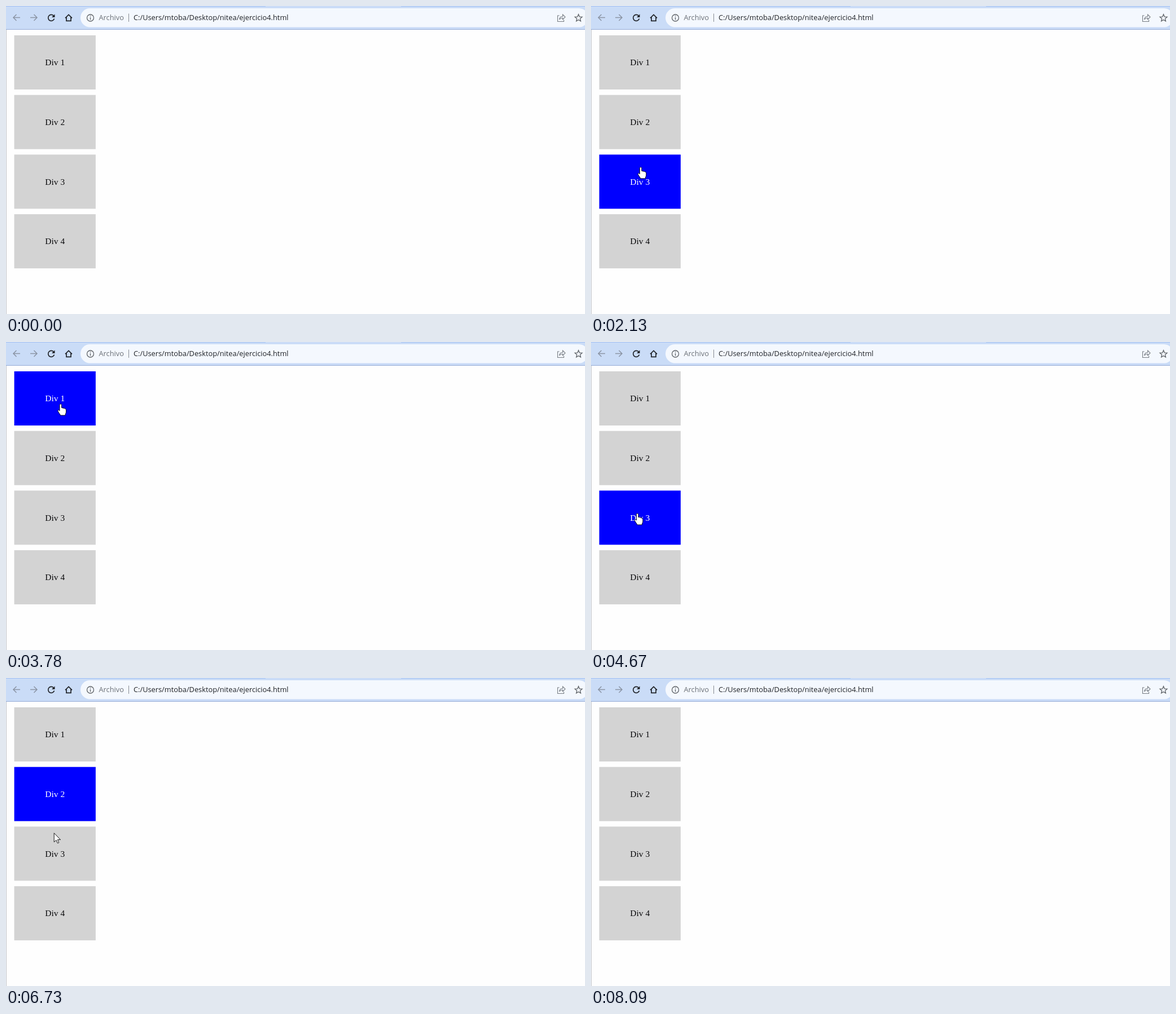
An HTML page that plays this animation: 1026x546 px, repeating every 8.42 s.

```html
<!DOCTYPE html>
<html lang="es">
<head>
<meta charset="utf-8">
<title>Hover</title>
<style>
  html, body { margin: 0; width: 100%; height: 100%; overflow: hidden; background: #fefefe; }
  svg { display: block; width: 1026px; height: 546px; }
  .ui { font: 12.8px "Open Sans", "Noto Sans", sans-serif; }
  .box text { font: 15.5px "Liberation Serif", "Times New Roman", serif; text-anchor: middle; }
  .icon { fill: none; stroke: #1f2227; stroke-width: 1.7; }
  .dim { stroke: #8b95a5; stroke-width: 1.5; }
  .thin { stroke: #5f6368; stroke-width: 1.3; }
  .faint { stroke: #777c83; stroke-width: 1.1; }
  #cursor path { fill: #fff; stroke: #000; stroke-width: .9; stroke-linejoin: round; }
</style>
</head>
<body>
<svg viewBox="0 0 1026 546">
  <rect width="1026" height="546" fill="#fefefe"/>
  <rect y="42" width="1" height="504" fill="#c4c6ca"/>

  <!-- Toolbar -->
  <rect width="1026" height="41" fill="#cadcf7"/>
  <path d="M0 .5H460M700 .5H1026" stroke="#a3c1f3"/>
  <path d="M0 41.5H1026" stroke="#94abd6"/>
  <rect x="132" y="4" width="900" height="33.5" rx="16.7" fill="#f4f8fe"/>
  <path class="icon dim" d="M25 20.5H13M18.5 15L13 20.5L18.5 26M43 20.5H55M49.5 15L55 20.5L49.5 26"/>
  <path class="icon" d="M84.6 17.5A5.5 5.5 0 1 0 85.5 22.5"/>
  <path d="M86.5 14.5V20H81Z" fill="#1f2227"/>
  <path class="icon" d="M105 21.3L111 15.5L117 21.3M107 20V26.3H115V20"/>
  <circle class="icon thin" cx="149.5" cy="21" r="6"/>
  <path class="icon thin" d="M149.5 20V24.5M149.5 17V18.5"/>
  <path d="M217.5 13.5V28" stroke="#858a91"/>
  <text class="ui" x="164.5" y="25.3" fill="#6b7077">Archivo</text>
  <text class="ui" x="226" y="25.3" fill="#202328">C:/Users/mtoba/Desktop/nitea/ejercicio4.html</text>
  <path class="icon faint" d="M980.5 17H977.5V27.5H988.5V24.5M980.5 24C981 20.5 983 18.5 986.5 18.5V15L991 19.5L986.5 24V21.3C984 21.3 982 22 980.5 24Z"/>
  <path id="star" class="icon thin"/>

  <g id="boxes"></g>
  <g id="cursor">
    <path id="arrow" d="M0 0V16L3.8 12.6L6.2 18L8.6 17L6.2 11.8H11.3Z"/>
    <path id="hand" d="M-2 1.5C-2 -.5 1.5 -.5 1.5 1.5V6.5L6 7.5C8.5 8 9.5 9 9.5 11V14C9.5 16 8 17 8 20H-.5C-1 18 -3.5 16 -5 12.5C-5.5 11 -4 10 -2.8 11L-2 12Z"/>
  </g>
</svg>
<script>
const LOOP = 8420, STEP = 70;
const SHAPE_LAG = 24, HOVER_LAG = 42; // the page reacts a little after the pointer moves
const BOX = { x: 14.6, y: 52, w: 144.3, h: 96, pitch: 105.7 };

// Each move eases from the previous rest point; "via" bends its path
const moves = [
  { start: 590, end: 1160, via: [126, 180], to: [106, 45] },
  { start: 1360, end: 2200, to: [88, 290] },
  { start: 2270, end: 3080, via: [70, 510], to: [337, 361] },
  { start: 3150, end: 3780, via: [130, 260], to: [97, 110] },
  { start: 4050, end: 4400, to: [88, 232] },
  { start: 4600, end: 4750, to: [80, 335] },
  { start: 4950, end: 5160, to: [86, 415] },
  { start: 5360, end: 6060, via: [318, 270], to: [98, 125] },
  { start: 6330, end: 7130, to: [71, 441] },
  { start: 7260, end: 8090, via: [300, 430], to: [1040, 560] }
];
moves.reduce((from, move) => {
  move.from = from;
  move.via ??= from.map((v, i) => (v + move.to[i]) / 2);
  return move.to;
}, [815, 520]);

const byId = id => document.getElementById(id);
const show = (el, on) => el.setAttribute("visibility", on ? "visible" : "hidden");
const ease = u => u * u * (3 - 2 * u);

function make(tag, attrs, parent) {
  const el = document.createElementNS("http://www.w3.org/2000/svg", tag);
  for (const name in attrs) el.setAttribute(name, attrs[name]);
  return parent.appendChild(el);
}

const boxes = [0, 1, 2, 3].map(i => {
  const y = BOX.y + BOX.pitch * i;
  const g = make("g", { class: "box" }, byId("boxes"));
  const rect = make("rect", { x: BOX.x, y, width: BOX.w, height: BOX.h }, g);
  const label = make("text", { x: BOX.x + BOX.w / 2, y: y + 53.3 }, g);
  label.textContent = "Div " + (i + 1);
  return { rect, label };
});

const starPoints = Array.from({ length: 10 }, (_, i) => {
  const a = (i / 5 - .5) * Math.PI, r = i % 2 ? 3 : 6.7;
  return (1014.5 + r * Math.cos(a)).toFixed(1) + " " + (21.5 + r * Math.sin(a)).toFixed(1);
});
byId("star").setAttribute("d", "M" + starPoints.join("L") + "Z");

// Point on the move's quadratic curve; the first visible step has already moved
function pointAt({ start, end, from, via, to }, t) {
  const u = (t - start + STEP) / (end - start + STEP);
  const e = ease(Math.min(1, Math.max(0, u))), r = 1 - e;
  return from.map((v, i) => r * r * v + 2 * r * e * via[i] + e * e * to[i]);
}

function boxAt([x, y]) {
  if (x < BOX.x || x > BOX.x + BOX.w || y < BOX.y) return -1;
  const i = Math.floor((y - BOX.y) / BOX.pitch);
  return i < 4 && y - BOX.y - i * BOX.pitch <= BOX.h ? i : -1;
}

function draw(time) {
  const move = moves.filter(m => m.start <= time).pop();
  let hovered = -1, pointing = false;
  if (move) {
    const { start, end } = move;
    const t = time >= end ? end : time - (time - start) % STEP;
    const [x, y] = pointAt(move, t);
    byId("cursor").setAttribute("transform", `translate(${x} ${y})`);
    hovered = boxAt(pointAt(move, t - HOVER_LAG));
    pointing = boxAt(pointAt(move, t - SHAPE_LAG)) >= 0;
  }
  boxes.forEach(({ rect, label }, i) => {
    rect.setAttribute("fill", i === hovered ? "#00f" : "#d3d3d3");
    label.setAttribute("fill", i === hovered ? "#fff" : "#0a0a0c");
  });
  show(byId("hand"), move && pointing);
  show(byId("arrow"), move && !pointing);
}

const began = performance.now();
function tick() {
  draw((performance.now() - began) % LOOP);
  requestAnimationFrame(tick);
}
tick();
</script>
</body>
</html>
```
